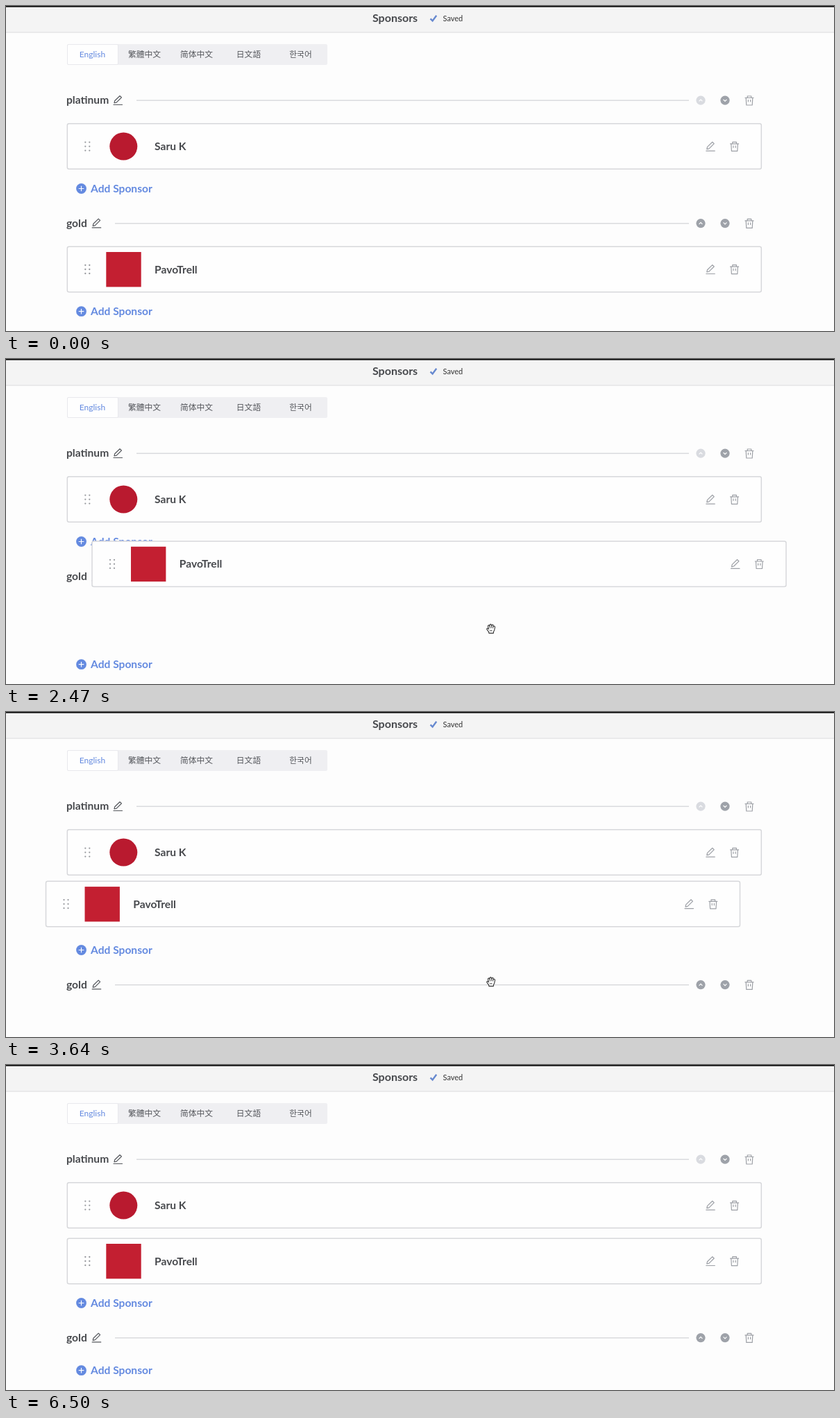
Recreate the animation shown at these times as an HTML page. Size 1193 by 469 pixels, loop 8000 ms.

```html
<!DOCTYPE html>
<html lang="en">
<head>
<meta charset="utf-8">
<title>Sponsors</title>
<style>
html, body { margin: 0; width: 100%; height: 100%; overflow: hidden; background: #fdfdfd; }
svg { display: block; }
text { font-family: Lato, "Open Sans", sans-serif; fill: #47494d; }
.bold { font-weight: 700; font-size: 15.6px; }
.title { font-weight: 700; font-size: 16px; }
.saved { font-size: 11px; fill: #333; }
.tab { font-size: 12px; text-anchor: middle; }
.cjk { font-family: "Noto Sans CJK TC", "Noto Sans CJK SC", "Noto Sans CJK JP", "Noto Sans CJK KR", "Noto Sans CJK", sans-serif; font-weight: 500; font-size: 11.8px; fill: #55575c; }
.blue { fill: #648ae0; }
.icon { fill: none; stroke: #9da0a6; stroke-width: 1.2; stroke-linejoin: round; stroke-linecap: round; }
.dark { stroke: #55585d; }
.box { fill: #fefefe; stroke: #d7d8db; stroke-width: 1.5; }
</style>
</head>
<body>
<svg id="stage" width="1193" height="469" xmlns="http://www.w3.org/2000/svg">
  <defs>
    <g id="pencil">
      <path d="M-6 6.5H6.5M-5 4L-4.3 .8L3 -6.3L5.4 -4L-1.8 3.2Z"/>
    </g>
    <g id="trash">
      <path d="M-6 -4H6M-2.8 -4V-6.5H2.8V-4M-4.8 -4L-4.2 6.5H4.2L4.8 -4M-1.6 -1V1.5M1.6 -1V1.5"/>
    </g>
    <g id="grip" fill="#97999e"></g>
    <g id="add">
      <circle cx="108.5" r="7.4" class="blue"/>
      <path d="M104.7 0H112.3M108.5 -3.8V3.8" stroke="#fff" stroke-width="1.2"/>
      <text x="122" y="5.6" class="bold blue">Add Sponsor</text>
    </g>
    <g id="chevron">
      <circle r="6.6"/>
      <path d="M-2.4 1.2L0 -1.2L2.4 1.2" fill="none" stroke="#fff" stroke-width="1.2"/>
    </g>
  </defs>

  <rect width="1193" height="469" fill="#fdfdfd"/>
  <rect width="1193" height="38" fill="#f4f4f4"/>
  <rect y="37.5" width="1193" height="1.2" fill="#e2e2e3"/>
  <rect width="1193" height="1.6" fill="#080808"/>
  <text x="528" y="23.4" class="title">Sponsors</text>
  <path d="M611.5 18.3L614.6 21.4L620.2 13.8" fill="none" stroke="#6789cf" stroke-width="2.4"/>
  <text x="629.5" y="21.5" class="saved">Saved</text>

  <rect x="88" y="55" width="375" height="30" rx="2" fill="#efeff2"/>
  <rect x="88.5" y="55.5" width="73" height="29" rx="1.5" fill="#fefefe" stroke="#e9e9ed"/>
  <g id="tabs"></g>
  <g id="platinum"></g>
  <use id="addTop" href="#add"/>
  <g id="gold"></g>
  <use id="addLow" href="#add"/>
  <g id="fixedCard"></g>
  <g id="dragCard"></g>

  <g id="hand">
    <path d="M-3.2 6.6L-3.4 4.8L-6 1.4C-6.8 .2 -5.6 -.9 -4.5 -.1L-3.5 .8L-4.6 -3.4C-4.8 -4.8 -3.1 -5.4 -2.5 -4.1L-2.1 -3.1L-1.9 -5.2C-1.7 -6.5 .1 -6.5 .4 -5.2L.6 -3.5L1.2 -4.9C1.8 -6 3.3 -5.5 3.2 -4.2L3 -2.7C3.7 -4 5.8 -3.7 5.5 -1.9L4.7 2.2L3.4 4.7V6.6Z" fill="#fff" stroke="#333" stroke-width="1.1" stroke-linejoin="round"/>
    <path d="M-2.1 -3.1L-1.3 -.5M.6 -3.5L.7 -.7M3 -2.7L2.6 -.5M-1.3 2V4M.7 2V4" fill="none" stroke="#333" stroke-width=".9"/>
  </g>
  <path id="arrow" d="M-2 -6V4.1L.4 2L2 5.7L3.7 5L2.1 1.4H5.2Z" fill="#111" stroke="#fff" stroke-width=".9"/>
</svg>

<script>
const LOOP = 8000;
const el = id => document.getElementById(id);
const move = (node, x, y) => node.setAttribute("transform", `translate(${x} ${y})`);
const icon = (name, x, y, cls = "") =>
  `<use href="#${name}" x="${x}" y="${y}" class="icon ${cls}"/>`;

for (const x of [-3, 3])
  for (const y of [-6, 0, 6])
    el("grip").innerHTML += `<circle cx="${x}" cy="${y}" r="1.15"/>`;

el("tabs").innerHTML = ["English", "繁體中文", "简体中文", "日文語", "한국어"].map((label, i) =>
  `<text x="${124.5 + i * 75}" y="74.4" class="tab ${i ? "cjk" : "blue"}">${label}</text>`
).join("");

// Section heading, centred on y = 0
const heading = (name, penX, lineX, upColor) => `
  <text x="87" y="5.2" class="bold">${name}</text>
  ${icon("pencil", penX, 0, "dark")}
  <path d="M${lineX} .3H984" stroke="#dadbde" stroke-width="1.5"/>
  <use href="#chevron" fill="${upColor}" transform="translate(1001 .2)"/>
  <use href="#chevron" fill="#9ea2a9" transform="translate(1036 .2) scale(1 -1)"/>
  ${icon("trash", 1071, .5)}`;

// Sponsor card, measured from its top left corner
const card = (name, logo) => `
  <rect width="1000" height="65.5" rx="2.5" class="box"/>
  <use href="#grip" x="29" y="32.8"/>
  ${logo}
  <text x="125.8" y="38.4" class="bold">${name}</text>
  ${icon("pencil", 926.5, 32.8)}
  ${icon("trash", 961.3, 33)}`;

el("platinum").innerHTML = heading("platinum", 161, 188, "#d9dbe0");
el("gold").innerHTML = heading("gold", 130.2, 157, "#9ea2a9");
el("fixedCard").innerHTML = card("Saru K", '<circle cx="81" cy="32.8" r="20" fill="#b91a2f"/>');
el("dragCard").innerHTML = card("PavoTrell", '<rect x="56" y="7.8" width="50.4" height="50.4" fill="#c31f31"/>');
move(el("platinum"), 0, 136);
move(el("fixedCard"), 88.3, 169.8);

// time, card x, card y, pointer, pointer x, pointer y
const steps = [
  [0, 88.3, 347.2, ""],
  [1430, 88.3, 347.2, "arrow", 712, 420],
  [1560, 88.3, 347.2, "hand", 700, 394],
  [1690, 88.3, 347.2, "hand", 699, 389],
  [2210, 111.5, 312, "hand", 699, 389],
  [2340, 121, 290, "hand", 699, 389],
  [2470, 124, 263, "hand", 699, 389],
  [2600, 119, 237, "hand", 699, 389],
  [2730, 108.3, 220, "hand", 699, 389],
  [2860, 98, 217.5, "hand", 699, 389],
  [2990, 91, 216.8, "hand", 699, 389],
  [3120, 89.3, 216.5, "hand", 699, 389],
  [3250, 72, 228, "hand", 699, 389],
  [3380, 57.5, 242, "hand", 699, 389],
  [3640, 57.5, 244.3, "hand", 699, 389],
  [3770, 59, 244.8, "hand", 699, 389],
  [3900, 68, 246.5, "hand", 699, 389],
  [4030, 79, 248.5, "hand", 699, 389],
  [4160, 86, 249.8, "hand", 699, 389],
  [4290, 88.3, 250.2, "arrow", 790, 410],
  [4420, 88.3, 250.2, "arrow", 865, 426],
  [6500, 88.3, 250.2, ""]
];
const SHIFT_AT = 2600, SETTLE_AT = 4550, ROW = 80;

function draw(t) {
  const [, x, y, pointer, px, py] = steps.findLast(s => s[0] <= t);
  const shift = t >= SHIFT_AT ? ROW : 0;
  move(el("dragCard"), x, y);
  move(el("addTop"), 0, 263.5 + shift);
  move(el("gold"), 0, 313.4 + shift);
  move(el("addLow"), 0, 440.7 + (t < SETTLE_AT ? shift : 0));
  for (const id of ["hand", "arrow"]) {
    el(id).style.display = id === pointer ? "" : "none";
    if (id === pointer) move(el(id), px, py);
  }
}

const start = performance.now();
function tick() {
  draw((performance.now() - start) % LOOP);
  requestAnimationFrame(tick);
}
tick();
</script>
</body>
</html>
```
